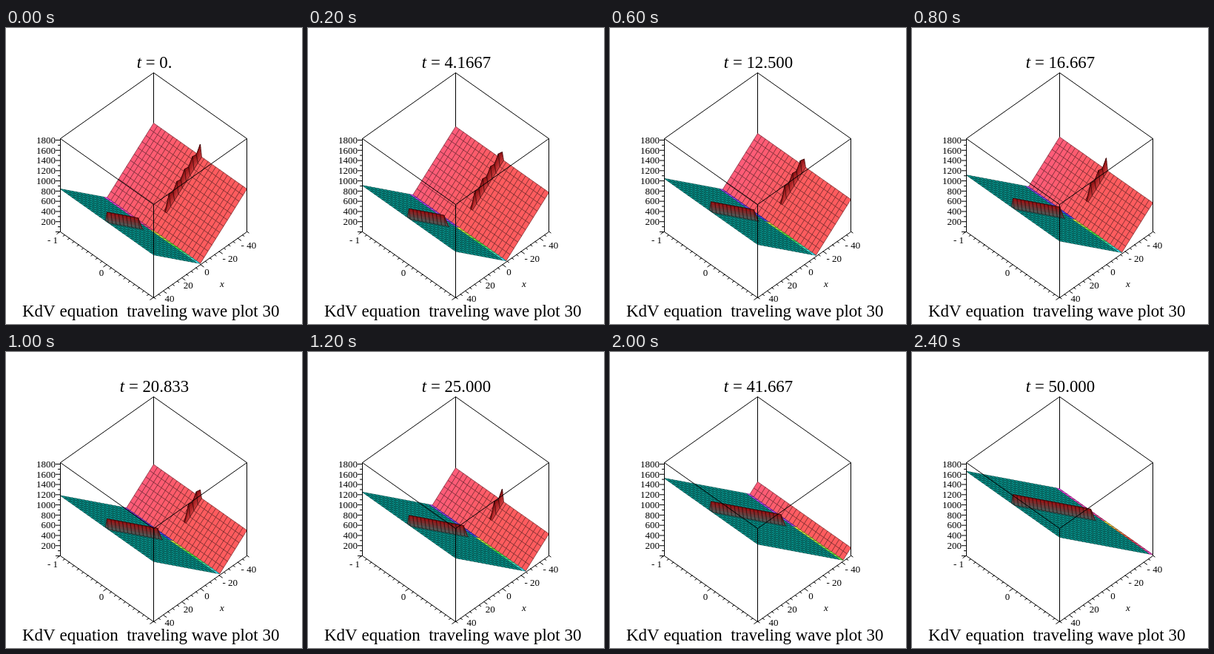
These frames come from a looping animation (400 by 400 pixels, 2500 ms). An HTML page with a canvas:

```html
<!DOCTYPE html>
<html>
<head>
<meta charset="utf-8">
<style>
html, body { margin: 0; width: 100%; height: 100%; overflow: hidden; background: #fff; }
canvas { display: block; }
</style>
</head>
<body>
<canvas id="stage" width="400" height="400"></canvas>
<script>
const ctx = document.getElementById('stage').getContext('2d');
const CELLS = 24, STEP = 100 / CELLS, STEPS = 25, STEP_MS = 100;
const SERIF = '"Liberation Serif", "Times New Roman", serif';
const RED = [255, 92, 94], PINK = [255, 92, 122], TEAL = [8, 160, 152], DARK = [150, 22, 24];

const lerp = (a, b, u) => a + (b - a) * u;
const mix = (a, b, u) => a.map((v, i) => lerp(v, b[i], u));
const css = c => `rgb(${c.map(Math.round)})`;

function hsl(h, s, l) {
  const a = s * Math.min(l, 1 - l);
  return [0, 8, 4].map(n => {
    const k = (((n + h / 30) % 12) + 12) % 12;
    return 255 * (l - a * Math.max(-1, Math.min(k - 3, 9 - k, 1)));
  });
}

// Floor position of (x, y), raised by h pixels
const project = (x, y, h = 0) => [
  199.5 + 63 * (y + 1) - 1.26 * (x + 50),
  186 + 44.5 * (y + 1) + 0.89 * (x + 50) - h
];

const surfaceHeight = m => 1.2 + 1.125 * Math.abs(m);

// Phase colour along the bottom of the valley
function valleyColor(y, t) {
  const late = Math.max(0, (t - 37.5) / 12.5);
  const early = Math.max(0, 1 - t / 6);
  const edge = Math.max(early, late);
  const hue = y < 0
    ? lerp(lerp(275, 300, edge), lerp(235, 335, edge), y + 1)
    : lerp(lerp(60, 45, early), lerp(190, -50, late), y);
  return hsl(hue, 1, 0.64);
}

function surfaceColor(m, y, t) {
  const base = m < 0 ? mix(RED, PINK, Math.max(0, -y)) : TEAL;
  return mix(base, valleyColor(y, t), Math.max(0, 1 - Math.abs(m) / STEP));
}

function trace(points) {
  ctx.beginPath();
  points.forEach(p => ctx.lineTo(p[0], p[1]));
}

function fillQuad(points, color) {
  trace(points);
  ctx.closePath();
  ctx.fillStyle = ctx.strokeStyle = css(color);
  ctx.lineWidth = 0.6;
  ctx.fill();
  ctx.stroke();
}

function outline(points, alpha) {
  trace(points);
  ctx.closePath();
  ctx.strokeStyle = `rgba(0,0,0,${alpha})`;
  ctx.lineWidth = 0.8;
  ctx.stroke();
}

function drawSurface(t) {
  const at = (i, j) => {
    const x = -50 + i * STEP;
    return project(x, -1 + 2 * j / CELLS, surfaceHeight(x + t));
  };
  for (let i = 0; i < CELLS; i++) for (let j = 0; j < CELLS; j++) {
    const m = -50 + i * STEP + t;
    const quad = [at(i, j), at(i + 1, j), at(i + 1, j + 1), at(i, j + 1)];
    // each cell takes the phase of its far edge
    fillQuad(quad, surfaceColor(m, -1 + (2 * j + 1) / CELLS, t));
    outline(quad, 0.5);
  }
}

function finHeight(m) {
  if (Math.abs(m) < 13) return 0;
  return m < 0 ? 13 + 3 * Math.cos(Math.PI * m / STEP) : 13;
}

// Narrow ridge along y = 0, fading from its crest into the surface
function drawFin(t) {
  const BANDS = 4, HALF_WIDTH = 0.03;
  for (let i = 0; i < CELLS; i++) {
    const xs = [-50 + i * STEP, -50 + (i + 1) * STEP];
    const tall = xs.map(x => finHeight(x + t));
    if (!tall[0] && !tall[1]) continue;
    const foot = xs[0] + t < 0 ? RED : TEAL;
    for (const side of [-HALF_WIDTH, HALF_WIDTH]) {
      const at = (n, u) => project(xs[n], side * u, surfaceHeight(xs[n] + t) + tall[n] * (1 - u));
      const band = (u, v) => [at(0, u), at(1, u), at(1, v), at(0, v)];
      for (let k = 0; k < BANDS; k++) {
        fillQuad(band(k / BANDS, (k + 1) / BANDS), mix(DARK, foot, 0.6 * k / BANDS));
      }
      outline(band(0, 1), 0.6);
    }
  }
}

function line(...points) {
  trace(points);
  ctx.strokeStyle = '#000';
  ctx.lineWidth = 1;
  ctx.stroke();
}

function text(str, x, y, size, align = 'center', style = '') {
  ctx.font = `${style} ${size}px ${SERIF}`;
  ctx.textAlign = align;
  ctx.fillStyle = '#000';
  ctx.fillText(str, x, y);
}

function drawAxes() {
  const left = [73.5, 275.5], right = [325.5, 275.5], front = [199.5, 364.5];
  const up = p => [p[0], p[1] - 126];
  line(left, front, right, up(right), up(front), up(left), left);
  line(front, up(front));
  line(up(left), [199.5, 60.5], up(right));

  for (let z = 0; z <= 1800; z += 100) {
    const y = 275.5 - z * 0.0689, major = z % 200 === 0;
    line([73.5, y], [major ? 67 : 70, y]);
    if (major && z) text(z, 67, y + 4.3, 13, 'right');
  }
  for (let k = 0; k <= 20; k++) {
    const [x, y] = project(50, -1 + k / 10), s = k % 10 ? 3 : 5;
    line([x, y], [x - s, y + s * 0.7]);
  }
  for (let v = -50; v <= 50; v += 5) {
    const [x, y] = project(v, 1), s = v % 20 ? 3 : 5;
    line([x, y], [x + s, y + s * 0.7]);
  }
  text('- 1', 63, 290.5, 13);
  text('0', 129, 335, 13);
  for (let v = 40; v >= -40; v -= 20) {
    const [x, y] = project(v, 1);
    text(v < 0 ? '- ' + -v : v, x + (v < 0 ? 15 : 9), y + 14.5, 13);
  }
  text('x', 292, 350, 13, 'center', 'italic');
}

function drawTitle(t) {
  const value = ' = ' + (t ? t.toPrecision(5) : '0.'), size = 22.8;
  ctx.font = `${size}px ${SERIF}`;
  const valueWidth = ctx.measureText(value).width;
  ctx.font = `italic ${size}px ${SERIF}`;
  const nameWidth = ctx.measureText('t').width;
  const x = 200.5 - (valueWidth + nameWidth) / 2;
  text('t', x, 54, size, 'left', 'italic');
  text(value, x + nameWidth, 54, size, 'left');
}

function render(now) {
  const t = 50 * (Math.floor(now / STEP_MS) % STEPS) / (STEPS - 1);
  ctx.fillStyle = '#fff';
  ctx.fillRect(0, 0, 400, 400);
  ctx.lineJoin = 'round';
  line([199.5, 60.5], [199.5, 186]);
  drawSurface(t);
  drawFin(t);
  drawAxes();
  drawTitle(t);
  text('KdV equation  traveling wave plot 30', 22, 390, 23, 'left');
}

const start = performance.now();
function loop() {
  render(performance.now() - start);
  requestAnimationFrame(loop);
}
loop();
</script>
</body>
</html>
```
